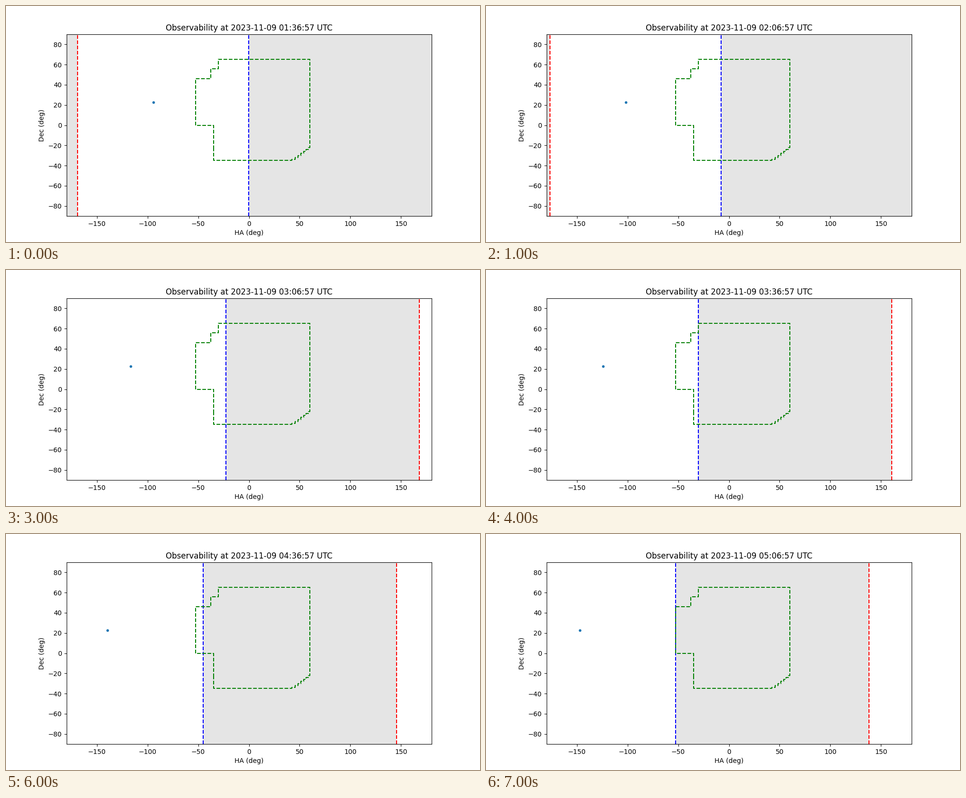
Animation of 1000x500 px, one loop 8000 ms. Source, as a matplotlib script:

```python
import matplotlib.pyplot as plt
import numpy as np
from matplotlib.animation import FuncAnimation

FRAMES, INTERVAL = 8, 1000
STEP_DEG = 7.5 * 1.0027379  # sidereal rotation in half an hour
START_MINUTE = 96
EAST_HA, WEST_HA = -0.1, -169.17
TARGET_HA, TARGET_DEC = -94.23, 22.55


def wrap(angle):
    return (angle + 180) % 360 - 180


def pointing_limits():
    """Outline of alternating vertical and horizontal edges."""
    steps = np.arange(6, -1, -1)
    stair_ha = 58.75 - 2.3 * steps - 0.07 * steps**2
    stair_dec = -22 - 2 * steps
    ha = np.r_[-35, stair_ha, 60, -30, -37.5, -52.5, -35]
    dec = np.r_[-22, -35, stair_dec, 65, 56, 46, 0, -22]
    return np.repeat(ha, 2), np.repeat(dec, 2)[1:-1]


fig, ax = plt.subplots(figsize=(10, 5), dpi=100)
ax.set_aspect("equal")
ax.set(xlim=(-180, 180), ylim=(-90, 90), xlabel="HA (deg)", ylabel="Dec (deg)")
title = ax.set_title("")

east = ax.axvline(0, color="b", ls="--")
west = ax.axvline(0, color="r", ls="--")
ax.plot(*pointing_limits(), "g--")
target, = ax.plot([], [], ".", color="C0")
shades = [ax.axvspan(0, 1, color="k", alpha=0.1, lw=0, zorder=0.5)
          for _ in range(2)]


def shade(patch, left, right):
    patch.set_x(left)
    patch.set_width(right - left)


def update(frame):
    turn = frame * STEP_DEG
    east_ha, west_ha = wrap(EAST_HA - turn), wrap(WEST_HA - turn)
    east.set_xdata([east_ha] * 2)
    west.set_xdata([west_ha] * 2)
    target.set_data([wrap(TARGET_HA - turn)], [TARGET_DEC])

    wrapped = west_ha < east_ha
    shade(shades[0], east_ha, 180 if wrapped else west_ha)
    shade(shades[1], -180, west_ha if wrapped else -180)

    hour, minute = divmod(START_MINUTE + 30 * frame, 60)
    title.set_text(f"Observability at 2023-11-09 {hour:02d}:{minute:02d}:57 UTC")
    return [title, east, west, target, *shades]


animation = FuncAnimation(fig, update, frames=FRAMES, interval=INTERVAL,
                          repeat=True, repeat_delay=0, blit=False)
plt.show()
```
